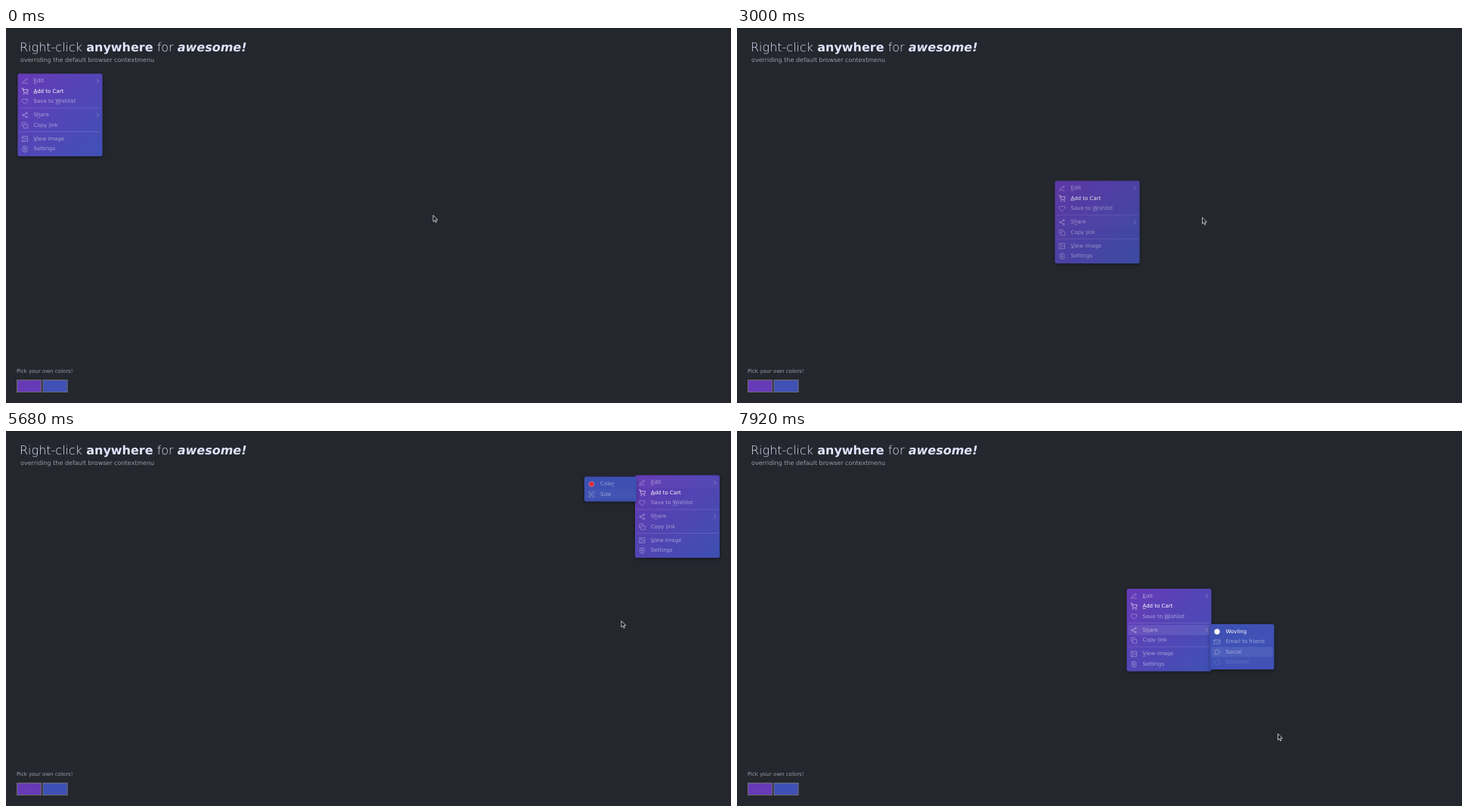
An HTML page that plays this animation: 959x497 px, repeating every 8000 ms.

```html
<!DOCTYPE html>
<html lang="en">
<head>
<meta charset="utf-8">
<title>Context menu</title>
<style>
html, body { margin: 0; width: 100%; height: 100%; overflow: hidden; background: #24272e; }
/* laid out at double size, shown at half */
#stage {
  position: absolute; width: 1918px; height: 994px; overflow: hidden;
  transform: scale(.5); transform-origin: 0 0;
  font: 14px/27px "DejaVu Sans", sans-serif; text-rendering: geometricPrecision;
  white-space: pre; color: #9a9ca5; background: #24272e;
  box-shadow: inset -2px 2px #1e2127;
}
#stage > * { position: absolute; margin: 0; }
h1 { left: 36px; top: 29px; font-size: 32px; line-height: 42px; font-weight: 200; color: #dfe4fd; }
h1 b { font-weight: 700; }
#sub { left: 38px; top: 71px; font-size: 16px; }
#pick { left: 28px; top: 896px; }
.swatch { box-sizing: border-box; top: 932px; width: 66px; height: 34px; border: 2px solid #6d6d6b; }
.menu {
  position: absolute; box-sizing: border-box; padding: 6px 4px; border-radius: 5px;
  box-shadow: 0 3px 9px rgba(0, 0, 0, .4);
}
#main { width: 224px; background: linear-gradient(to bottom right, #673ab7, #3f51b5); }
.menu .menu { background: #3f51b5; }
.row { position: relative; height: 27px; padding-left: 38px; border-radius: 3px; color: rgba(255, 255, 255, .5); }
.row.strong { color: #fff; }
.row.off { opacity: .35; }
.row u { text-underline-offset: 2px; text-decoration-thickness: 1px; }
.row svg { position: absolute; left: 6px; top: 4.5px; }
.row svg.more { left: 199px; }
.line { height: 2px; margin: 3px 0 4px; background: rgba(255, 255, 255, .13); }
svg { fill: none; stroke: currentColor; stroke-width: 1.6; stroke-linecap: round; stroke-linejoin: round; overflow: visible; }
</style>
</head>
<body>
<div id="stage">
  <h1>Right-click <b>anywhere</b> for <b><i>awesome!</i></b></h1>
  <div id="sub">overriding the default browser contextmenu</div>
  <div id="pick">Pick your own colors!</div>
  <div class="swatch" style="left:28px;background:#673ab7"></div>
  <div class="swatch" style="left:97px;background:#3f51b5"></div>
  <div id="main" class="menu"></div>
  <svg id="cursor" width="14" height="22" style="left:-1px;top:0"><path d="M0 0V16L3.7 12.5 6.4 18.6 9 17.4 6.4 11.5H11Z" fill="#15161a" stroke="#fff" stroke-width="1.4"/></svg>
</div>
<script>
const ring = (x, y, r) => `M${x - r} ${y}a${r} ${r} 0 1 0 ${2 * r} 0a${r} ${r} 0 1 0 ${-2 * r} 0`;
const icons = {
  edit: 'M12 20h9M16.5 3.5a2.1 2.1 0 0 1 3 3L7 19l-4 1 1-4z',
  cart: 'M1 1h4l2.7 13.4a2 2 0 0 0 2 1.6h9.7a2 2 0 0 0 2-1.6L23 6H6' + ring(9, 21, 1) + ring(20, 21, 1),
  heart: 'M20.8 4.6a5.5 5.5 0 0 0-7.8 0L12 5.7l-1.1-1.1a5.5 5.5 0 0 0-7.8 7.8L12 21.2l8.8-8.8a5.5 5.5 0 0 0 0-7.8z',
  share: ring(18, 5, 3) + ring(6, 12, 3) + ring(18, 19, 3) + 'M8.6 13.5l6.8 4M15.4 6.5l-6.8 4',
  copy: 'M9 9h13v13H9zM5 15H2V2h13v3',
  image: 'M3 3h18v18H3z' + ring(8.5, 8.5, 1.5) + 'M21 15l-5-5L5 21',
  gear: ring(12, 12, 3) + 'M9.5 2h5l1 3 3-.6 2.5 4.3-2 2.3v2l2 2.3-2.5 4.3-3-.6-1 3h-5l-1-3-3 .6L3 15.3 5 13v-2L3 8.7l2.5-4.3 3 .6z',
  mail: 'M2 5h20v14H2zM22 6l-10 7L2 6',
  chat: 'M21 11.5a8.4 8.4 0 0 1-12.5 7.6L3 21l1.9-5.5A8.4 8.4 0 1 1 21 11.5z',
  size: 'M3 8V3h5M16 3h5v5M21 16v5h-5M8 21H3v-5M9 9h6v6H9z',
  disc: ring(12, 12, 9),
  more: 'M9 18l6-6-6-6'
};
const icon = (name, style = '') =>
  `<svg class="${name}" style="${style}" width="18" height="18" viewBox="0 0 24 24"><path d="${icons[name]}"/></svg>`;
const row = (name, label, { cls = '', style, extra = '' } = {}) =>
  `<div class="row ${cls}">${icon(name, style)}${label}${extra}</div>`;
const submenu = (left, width, ...rows) =>
  icon('more') + `<div class="menu" style="left:${left}px;top:-2px;width:${width}px">${rows.join('')}</div>`;
const line = '<div class="line"></div>';

const main = document.getElementById('main');
const cursor = document.getElementById('cursor');
main.innerHTML = [
  row('edit', '<u>E</u>dit', { extra: submenu(-138, 138,
    row('disc', 'Colo<u>r</u>', { style: 'fill:#e0283c;stroke:#d795b4' }),
    row('size', 'Size')) }),
  row('cart', '<u>A</u>dd to Cart', { cls: 'strong' }),
  row('heart', 'Save to <u>W</u>ishlist'),
  line,
  row('share', 'S<u>h</u>are', { extra: submenu(216, 170,
    row('disc', 'Wovling', { cls: 'strong', style: 'fill:#fff' }),
    row('mail', 'Email to friend'),
    row('chat', 'Social'),
    row('disc', 'Disabled', { cls: 'off' })) }),
  row('copy', 'Copy <u>l</u>ink'),
  line,
  row('image', '<u>V</u>iew image'),
  row('gear', 'Settings')
].join('');
const rows = [...main.querySelectorAll('.row')];

// pointer moves: start, end, then the place it reaches
const start = [15.5, 60.5];
const moves = [
  [-400, -100, 565.5, 248.5],
  [760, 1000, 486, 254],
  [1159, 1160, 451, 249],
  [1400, 1760, 420.5, 202.5],
  [2600, 2840, 616, 251.5],
  [3000, 3760, 931, 65],
  [3840, 4120, 925, 58.5],
  [4200, 4400, 922, 61.3],
  [4660, 4820, 890, 70],
  [4840, 5160, 815, 74],
  [5420, 5660, 814.5, 252],
  [5740, 6080, 515.5, 209],
  [6560, 6760, 560, 264],
  [6800, 7060, 690, 268],
  [7160, 7420, 680, 294],
  [7760, 7900, 716, 401.5]
];
// right click that opens the menu, click that closes it
const clicks = [[-500, 790], [1860, 2950], [4140, 5660], [6130, 7930]];

const clamp = v => Math.max(0, Math.min(1, v));
const ease = v => (v = clamp(v), v * v * (3 - 2 * v));
const pointer = t => moves.reduce(([x, y], [from, to, toX, toY]) => {
  const k = ease((t - from) / (to - from));
  return [x + (toX - x) * k, y + (toY - y) * k];
}, start);

// share of the last `span` ms that the pointer spent on any of the elements
function dwell(t, span, ...elements) {
  const boxes = elements.map(e => e.getBoundingClientRect());
  const steps = 24;
  let hits = 0;
  for (let i = 0; i < steps; i++) {
    const [x, y] = pointer(t - span * i / steps);
    if (boxes.some(b => x >= b.left && x < b.right && y >= b.top && y < b.bottom)) hits++;
  }
  return hits / steps;
}

function draw(t) {
  const [x, y] = pointer(t);
  cursor.style.transform = `translate(${2 * x}px, ${2 * y}px)`;

  const [open, close] = clicks.filter(c => c[0] <= t).pop();
  const [left, top] = pointer(open);
  main.style.left = Math.min(2 * left, 1918 - 224 - 30) + 'px';
  main.style.top = 2 * top + 'px';
  main.style.opacity = ease((t - open) / 350) * (1 - ease((t - close) / 230));

  for (const r of rows) {
    const sub = r.querySelector('.menu');
    const area = sub ? [r, sub] : [r];
    const glow = dwell(t, 250, ...area);
    r.style.backgroundColor = `rgba(255, 255, 255, ${.18 * glow})`;
    // a submenu needs a short stay to open and lingers after the pointer has left
    if (sub) sub.style.opacity = clamp(4 * dwell(t, 450, ...area) - .8);
  }
}
function tick() {
  draw(performance.now() % 8000);
  requestAnimationFrame(tick);
}
tick();
</script>
</body>
</html>
```
